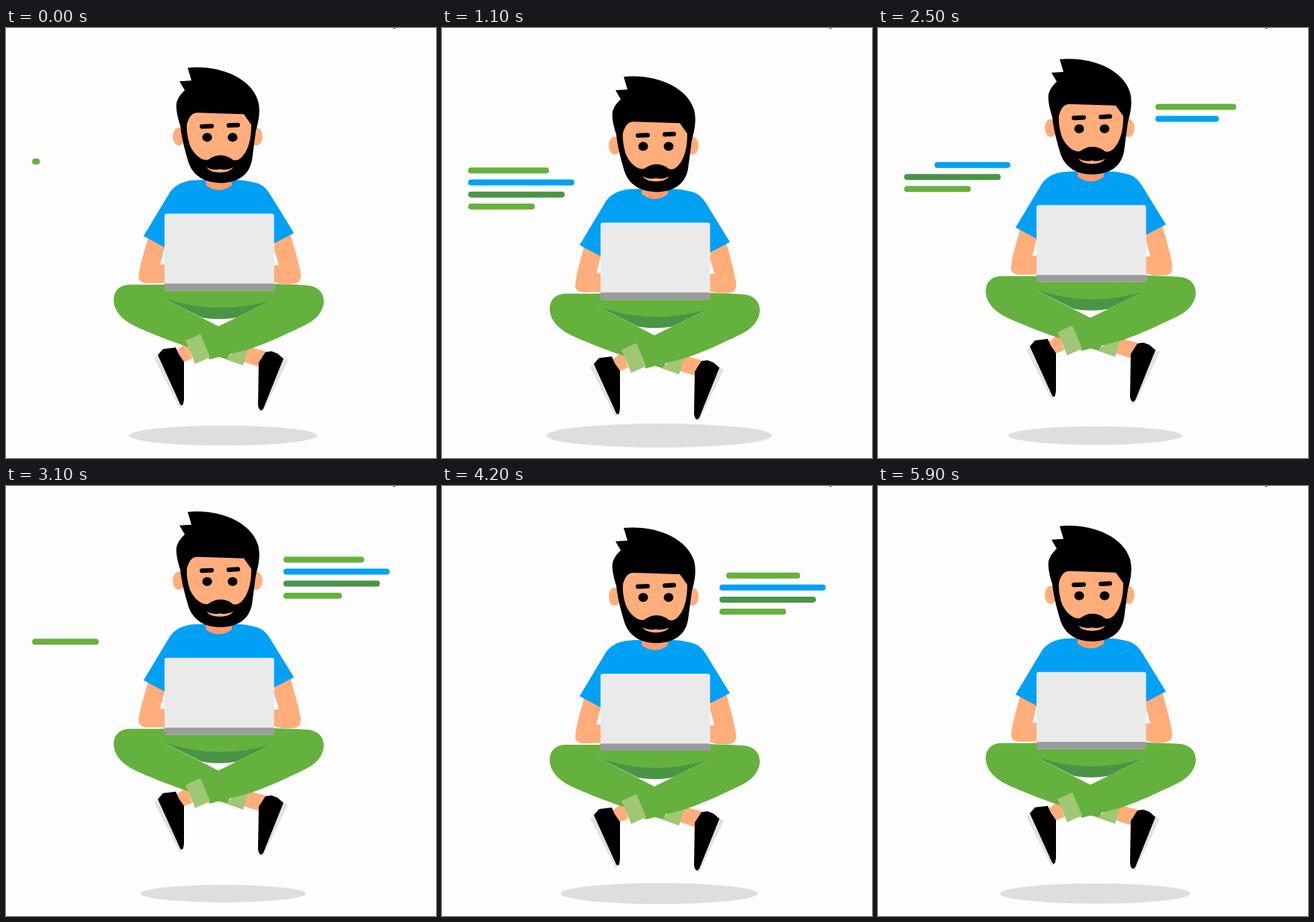
Write an HTML page that moves like this. It is 575 px wide and 575 px high and loops after 6000 ms.

```html
<!DOCTYPE html>
<html lang="en">
<head>
<meta charset="utf-8">
<title>Floating coder</title>
<style>
  html, body { margin: 0; width: 100%; height: 100%; overflow: hidden; background: #fdfdfd; }
  svg { display: block; width: 100vw; height: 100vh; }
  .skin { fill: #ffad7b; }
  .green { fill: #65b13d; }
  .dark { fill: #4a9545; }
  .light { fill: #a0c775; }
  .blue { fill: #00a0f5; }
  .sole { fill: #e2e2e4; }
</style>
</head>
<body>
<svg viewBox="0 0 575 575">
  <path d="M522 0H575V4H530Z" fill="#fff"/>
  <path d="M518 0h3v1h-3z" fill="#555"/>
  <ellipse id="shadow" cx="290.5" cy="545" fill="#dedede"/>
  <g id="floating">
    <g id="code"></g>

    <!-- feet -->
    <path class="skin" d="M228 431L242 420L249 442L236 447ZM324 426L347 432L339 453L317 446Z"/>
    <path class="sole" d="M198 441L206 437L236 504L232 508ZM369 441L377 444L344 513H339Z"/>
    <path d="M203 437L210 429L227 427L231 436L238 446V496Q237 508 233 503Z"/>
    <path d="M338 447L347 433L355 432L363 435L371 442L344 509Q339 515 337 504Z"/>

    <!-- trousers -->
    <path class="dark" d="M208 360L359 362L308 387Q285 391 262 387Z"/>
    <path class="green" d="M205 343H360V362Q285 387 208 360Z"/>
    <path class="green" d="M166 343C150 343 144 353 144 364C145 382 160 393 178 401C200 411 250 430 296 443L310 412L208 360L285 343Z"/>
    <path class="light" d="M303 434L324 428L317 451L294 443Z"/>
    <path class="green" d="M212 343Q340 340 402 344C418 345 425 354 425 366C424 381 413 391 398 398C375 409 350 421 326 429L272 443L261 410L359 362Z"/>
    <path class="light" d="M240 418L260 409L273 440L253 449Z"/>

    <!-- arms and shirt -->
    <path id="armL" class="skin" d="M190 280L213 290L206 316H214V341H187C178 340 176 334 178 327C180 312 186 296 190 280Z"/>
    <path id="armR" class="skin" d="M360 286L380 275C386 295 391 312 394 328C395 338 391 342 383 342C372 343 365 342 357 339V317H365L358 294Z"/>
    <path class="blue" d="M268 203C258 203 250 203 241 205C229 208 222 214 217 223L184 278L212 293V300H358V288L385 274L353 222C347 212 340 207 326 205C318 203 310 203 302 203Z"/>
    <path fill="#ff9b6c" d="M267 201H302V210Q285 223 267 210Z"/>

    <!-- head -->
    <ellipse class="skin" cx="231" cy="145" rx="8" ry="12"/>
    <ellipse class="skin" cx="335" cy="145" rx="8" ry="12"/>
    <path d="M243 53C285 49 327 66 337 97C341 112 337 127 334 138L329 176C325 198 308 207 286 207C263 207 248 195 243 176C239 162 235 148 233 130C229 118 226 103 229 97C231 91 235 87 239 83L232 71L248 70Z"/>
    <path class="skin" d="M242 128C245 118 249 113 256 113L318 115L328 129C328 146 325 160 318 169C313 176 308 178 303 176C298 171 291 170 286 170C280 170 275 173 270 176C262 178 252 170 246 157C243 148 241 137 242 128Z"/>
    <path class="skin" d="M268 186Q277 191 286 188.5Q295 191 304 186Q299 193 286 193Q273 193 268 186Z"/>
    <path d="M262 131.5L275 131M298 130.2L310 129.6" stroke="#000" stroke-width="6" stroke-linecap="round"/>
    <ellipse class="eye" cx="269" cy="146" rx="6.5"/>
    <ellipse class="eye" cx="303" cy="146" rx="6.5"/>

    <!-- laptop -->
    <rect x="212" y="248" width="146.5" height="103" rx="3" fill="#eaeaea"/>
    <rect x="212" y="341.5" width="146.5" height="9.5" fill="#9b9b9f"/>
  </g>
</svg>
<script>
  const LOOP = 6000, STEP = 100;
  const $ = id => document.getElementById(id);
  const clamp = v => Math.min(1, Math.max(0, v));

  const lineTypes = [[108, 'green'], [142, 'blue'], [129, 'dark'], [89, 'green']];
  // Lines are typed one after another, then wiped from the left in the same order.
  const blocks = [
    { x: 35, y: 174.3, type: -25, typeDur: 263, wipe: 2050, wipeDur: 350 },
    { x: 371, y: 112.7, type: 2080, typeDur: 263, wipe: 4170, wipeDur: 358 }
  ];
  const lines = blocks.flatMap(block => lineTypes.map(([width, color], row) => {
    const el = document.createElementNS('http://www.w3.org/2000/svg', 'rect');
    el.setAttribute('class', color);
    el.setAttribute('y', block.y + row * 16.1);
    el.setAttribute('height', 8);
    el.setAttribute('rx', 3.8);
    $('code').append(el);
    return { el, block, width, row };
  }));

  // Linear sway through rest, low, rest, high; one second per leg.
  function sway(t, rest, low, high) {
    const keys = [rest, low, rest, high];
    const p = (t + 30) / 1000, i = Math.floor(p), f = p - i;
    return keys[i % 4] * (1 - f) + keys[(i + 1) % 4] * f;
  }

  function draw(t) {
    $('floating').setAttribute('transform', `translate(0 ${sway(t, -0.3, 14, -21)})`);
    const rx = sway(t, 124.9, 155, 108.5);
    $('shadow').setAttribute('rx', rx);
    $('shadow').setAttribute('ry', rx * 0.106);

    for (const { el, block, width, row } of lines) {
      const typed = clamp((t - block.type) / block.typeDur - row);
      const wiped = clamp((t - block.wipe) / block.wipeDur - row);
      el.setAttribute('x', block.x + width * wiped);
      el.setAttribute('width', width * (typed - wiped));
    }

    const tap = 0.5 - Math.cos(t / 440 * 2 * Math.PI) / 2;
    $('armL').setAttribute('transform', `rotate(${-tap} 200 285)`);
    $('armR').setAttribute('transform', `rotate(${tap} 371 281)`);

    const open = clamp(Math.abs(t - 4900) / 150 + 0.45);
    document.querySelectorAll('.eye').forEach(eye => eye.setAttribute('ry', 6 * open));
  }

  const start = performance.now();
  function tick() {
    const t = (performance.now() - start) % LOOP;
    draw(Math.floor(t / STEP) * STEP);
    requestAnimationFrame(tick);
  }
  tick();
</script>
</body>
</html>
```
